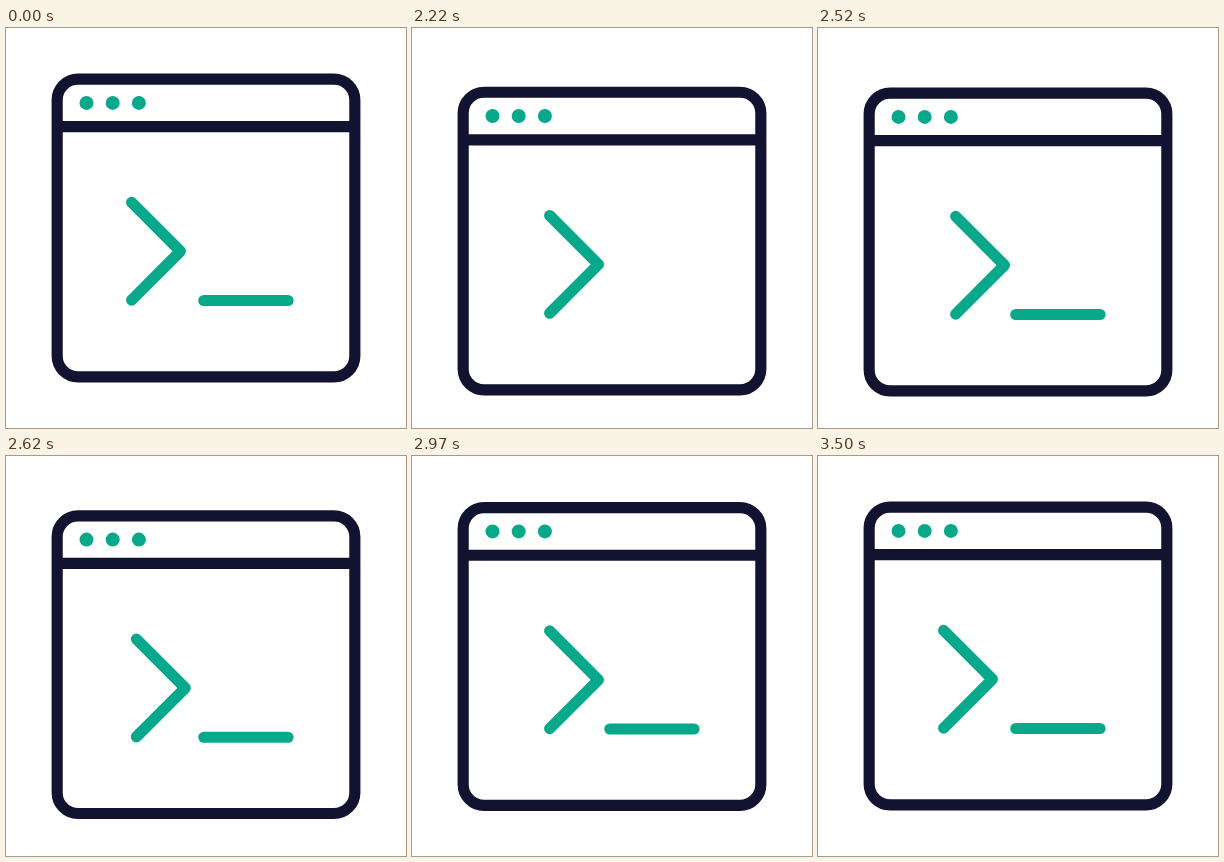
An HTML page that plays this animation: 400 px wide and 400 px high, repeating every 3.52 s.

```html
<!DOCTYPE html>
<html lang="en">
<head>
<meta charset="utf-8">
<title>Terminal icon</title>
<style>
  html, body { margin: 0; width: 100%; height: 100%; overflow: hidden; background: #fff; }
  svg { display: block; width: 100vw; height: 100vh; }
  .line { fill: none; stroke-width: 11.16; stroke-linejoin: round; }
  .dark { stroke: #121331; }
  .green { stroke: #08a88a; stroke-linecap: round; }
  .dot { fill: #08a88a; }
</style>
</head>
<body>
<svg viewBox="0 0 400 400">
  <g id="win">
    <rect class="line dark" x="51.16" y="51.16" width="297.68" height="297.68" rx="20.9"/>
    <path class="line dark" d="M51.16 98.7H348.84"/>
    <circle class="dot" cx="80.5" cy="74.9" r="7"/>
    <circle class="dot" cx="106.7" cy="74.9" r="7"/>
    <circle class="dot" cx="132.9" cy="74.9" r="7"/>
    <path id="prompt" class="line green" d="M125.6 174.4L174.4 223.3L125.6 272.1"/>
    <path id="cursor" class="line green" d="M197.8 272.5H282"/>
  </g>
</svg>
<script>
  const LOOP = 3520, REST = 2020, STEP = 25, QUARTER = 375, SHIFT = 18.6;
  const [win, prompt_, cursor] = ["win", "prompt", "cursor"].map(id => document.getElementById(id));

  // cubic-bezier(x1, 0, x2, 1)
  function ease(u, x1, x2) {
    if (u <= 0) return 0;
    if (u >= 1) return 1;
    let lo = 0, hi = 1;
    for (let i = 0; i < 24; i++) {
      const b = (lo + hi) / 2, c = 1 - b;
      if (3 * x1 * b * c * c + 3 * x2 * b * b * c + b * b * b < u) lo = b;
      else hi = b;
    }
    return lo * lo * (3 - 2 * lo);
  }

  const dropAt = t => SHIFT * (t < QUARTER
    ? ease(t / QUARTER, 0.31, 0.59)
    : 1 - ease((t - QUARTER) / (2 * QUARTER), 0.244, 0.267));

  function nudgeAt(t) {
    const phase = (t / QUARTER) % 2;
    return SHIFT * ease(phase < 1 ? phase : 2 - phase, 1 / 3, 2 / 3);
  }

  function cursorOn(t) {
    const phase = t % 500;
    return phase < 140 || phase >= 375;
  }

  function draw(now) {
    const time = now % LOOP;
    const t = time < REST ? 0 : Math.floor((time - REST + STEP) / STEP) * STEP;
    win.setAttribute("transform", `translate(0 ${dropAt(t).toFixed(3)})`);
    prompt_.setAttribute("transform", `translate(${nudgeAt(t).toFixed(3)} 0)`);
    cursor.setAttribute("visibility", cursorOn(t) ? "visible" : "hidden");
  }

  function tick() {
    draw(performance.now());
    requestAnimationFrame(tick);
  }
  tick();
</script>
</body>
</html>
```
